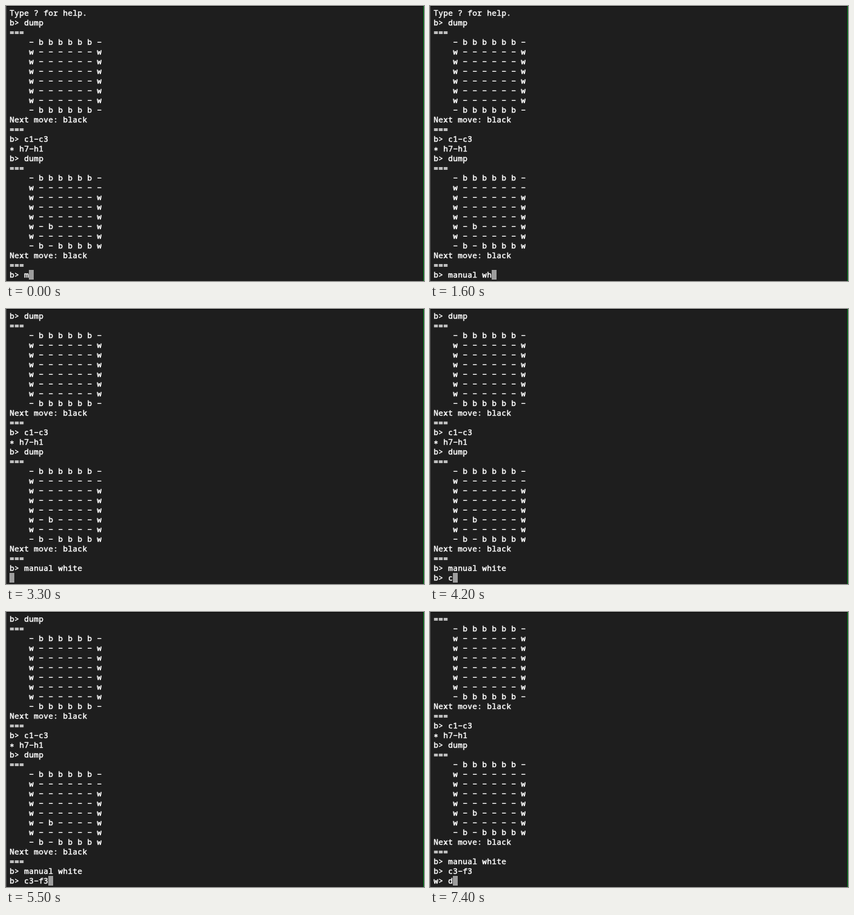
Write an HTML page that moves like this. It is 603 px wide and 397 px high and loops after 8 s.

```html
<!DOCTYPE html>
<html lang="en">
<head>
<meta charset="utf-8">
<title>Terminal session</title>
<style>
  html, body { margin: 0; width: 100%; height: 100%; overflow: hidden; background: #1e1e1e; }
  svg { display: block; }
  text {
    font: 500 11px "Noto Sans Mono", "DejaVu Sans Mono", monospace;
    fill: #fff;
    stroke: #fff;
    stroke-width: 0.45px;
    white-space: pre;
  }
</style>
</head>
<body>
<svg id="stage" width="603" height="397" viewBox="0 0 603 397">
  <rect width="603" height="397" fill="#1e1e1e"/>
  <rect width="603" height="1" fill="#0a0a0a"/>
  <rect width="1" height="397" fill="#484848"/>
  <rect x="602" width="1" height="397" fill="#04801c"/>
  <rect id="cursor" width="7" height="14" fill="#9d9d9d"/>
</svg>
<script>
const LOOP = 8000, ROWS = 28, CELL_W = 7, CELL_H = 14, LEFT = 5, TOP = 3, BASE = 11;
const NS = 'http://www.w3.org/2000/svg';
const stage = document.getElementById('stage');
const cursor = document.getElementById('cursor');

const edge = '- b b b b b b -';
const side = 'w - - - - - - w';
const board = rows => rows.map(r => '    ' + r).join('\n');
const dump = rows => `b> dump\n===\n${board(rows)}\nNext move: black\n===\n`;

const history = 'Type ? for help.\n' +
  dump([edge, ...Array(6).fill(side), edge]) +
  'b> c1-c3\n* h7-h1\n' +
  dump([edge, 'w - - - - - - -', side, side, side,
        'w - b - - - - w', side, '- b - b b b b w']) +
  'b> ';

// Each step appends its text at the given time.
const keys = (word, times) => times.map((t, i) => [t, word[i]]);
const steps = [
  ...keys('manual white', [0, 100, 300, 600, 900, 1100, 1300, 1500, 1600, 1800, 2100, 2300]),
  [3300, '\n'], [3400, 'b> '],
  ...keys('c3-f3', [4200, 4400, 4900, 5200, 5500]),
  [5600, '\nw> '], [7400, 'd']
];

const lines = Array.from({ length: ROWS }, (_, row) => {
  const el = document.createElementNS(NS, 'text');
  el.setAttribute('y', TOP + BASE + row * CELL_H);
  // One x per column keeps the character grid exact.
  el.setAttribute('x', Array.from({ length: 24 }, (_, c) => LEFT + 0.2 + c * CELL_W).join(' '));
  return stage.appendChild(el);
});

// The terminal face has wide, raised dashes and a centred asterisk.
const glyphs = s => s.replace(/-/g, '\u2212').replace(/\*/g, '\u2217');

let shown = '';
function render(t) {
  const text = history + steps.filter(s => s[0] <= t).map(s => s[1]).join('');
  if (text === shown) return;
  shown = text;
  const view = text.split('\n').slice(-ROWS);
  lines.forEach((el, i) => { el.textContent = glyphs(view[i]); });
  cursor.setAttribute('x', LEFT + view[ROWS - 1].length * CELL_W);
  cursor.setAttribute('y', TOP + (ROWS - 1) * CELL_H);
}

const start = performance.now();
function tick() {
  render((performance.now() - start) % LOOP);
  requestAnimationFrame(tick);
}
tick();
</script>
</body>
</html>
```
